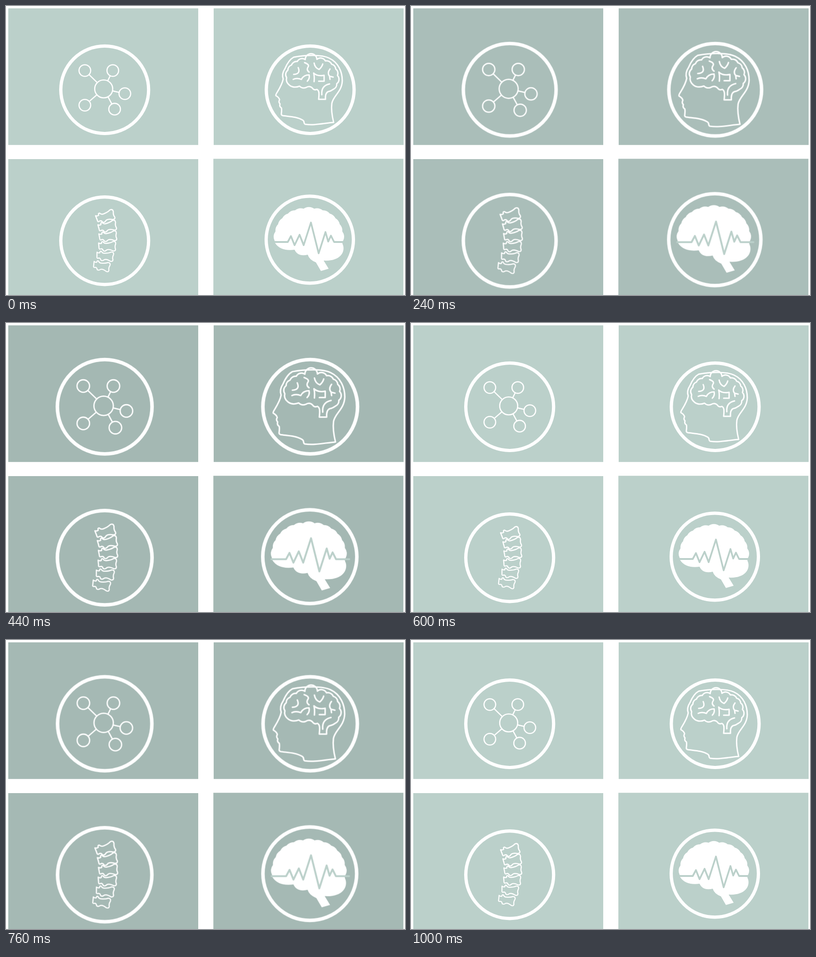
These frames come from a looping animation (878 by 638 pixels, 3000 ms). An HTML page:

```html
<!DOCTYPE html>
<html lang="en">
<head>
<meta charset="utf-8">
<title>Pulsing icons</title>
<style>
  html, body { margin: 0; width: 100%; height: 100%; overflow: hidden; background: #fff; }
  svg { display: block; width: 878px; height: 638px; }
  .icon { fill: none; stroke: #fff; stroke-width: 3; stroke-linecap: round; stroke-linejoin: round; }
  .ring { stroke-width: 7.2; }
  .thin { stroke-width: 2.6; }
  .solid { fill: #fff; stroke: none; }
  .wave { stroke: #bbd0ca; stroke-width: 3.8; }
</style>
</head>
<body>
<svg viewBox="0 0 878 638">
  <g id="panels" fill="#bbd0ca">
    <rect x="5" y="5.2" width="418" height="301.6"/>
    <rect x="457" y="5.2" width="418" height="301.6"/>
    <rect x="5" y="338" width="418" height="300"/>
    <rect x="456.3" y="337.3" width="418.2" height="300.7"/>
  </g>
  <g id="icons"></g>
</svg>
<script>
const path = (d, cls = '') => `<path class="${cls}" d="${d}"/>`;
const circle = (x, y, r, cls) => `<circle class="${cls}" cx="${x}" cy="${y}" r="${r}"/>`;

// Row of outward bumps along a squarish ellipse, clockwise, angles in degrees.
function scallops(cx, cy, rx, ry, from, to, count, bump, power) {
  const square = v => Math.sign(v) * Math.abs(v) ** power;
  let d = '';
  for (let i = 0; i <= count; i++) {
    const a = (from + (to - from) * i / count) * Math.PI / 180;
    d += (i ? `A${bump} ${bump} 0 0 1 ` : 'M') + `${cx + rx * square(Math.cos(a))},${cy + ry * square(Math.sin(a))}`;
  }
  return d;
}

function molecule() {
  const [cx, cy, hub, r] = [215, 183, 19.8, 12.8];
  const atoms = [[173.5, 142.5], [235, 142.5], [261.5, 193.5], [239, 227.7], [173.5, 219]];
  return circle(cx, cy, hub, 'thin') + atoms.map(([x, y]) => {
    const a = Math.atan2(y - cy, x - cx), c = Math.cos(a), s = Math.sin(a);
    return circle(x, y, r, 'thin') +
      path(`M${cx + hub * c},${cy + hub * s}L${x - r * c},${y - r * s}`, 'thin');
  }).join('');
}

function head() {
  const face = 'M606,237Q607,228 606,225Q601,222 603,216Q599,212 602,207Q601,202 594,198Q593,196 597,190' +
    'Q608,172 610,161Q606,150 614,138Q622,119 633,113';
  const skull = 'C660,108 695,107 711,115C732,125 740,146 740,165C739,190 720,198 717,215C715,231 718,245 721,257' +
    'C698,259 678,264 658,261C654,259 658,255 653,252C640,244 622,244 609,242Q605,241 606,237';
  const cortex = scallops(673.5, 158, 56, 40.5, 180, 395, 11, 12, 0.83) +
    'Q715,188 709,189Q702,192 703,206H688C689,195 690,187 684,184Q678,187 674,181Q668,175 660,180Q652,183 646,177Q633,182 624,175Q615,168 617.5,158';
  const folds = 'M657,125Q668,129 665,134Q660,141 667,146M643,136Q649,150 633,151M632,162Q640,158 650,162Q655,152 667,152Q669,160 663,166' +
    'M678,126Q680,137 689,140Q695,135 697,128M678,167Q679,155 677,148Q685,156 700,153V166H688' +
    'M713,139Q706,148 712,155L720,157M712,155L713,162M712,172Q693,176 695,196';
  return path(face + skull) + path(cortex) + path(folds);
}

function spine() {
  const bone = 'M-20,-4Q-16,-2 -13,-4Q-14,-9 -10,-8Q-7,-4 -2,-5Q8,-7 13,-11Q20,-13 20,-6Q18,1 21,6Q22,11 16,11' +
    'Q6,7 1,10Q-3,15 -7,13Q-9,8 -13,9Q-18,12 -18,6Z';
  return Array.from({ length: 6 }, (_, i) => {
    const x = 223.5 - 1.5 * (i - 2) ** 2, y = 463.5 + 21.8 * i;
    return `<g transform="translate(${x} ${y}) rotate(${5.4 * i - 10}) scale(${1 - 0.02 * i})">${path(bone, 'thin')}</g>`;
  }).join('');
}

function pulseBrain() {
  const top = scallops(666.5, 518, 75.5, 71, 180, 360, 13, 20, 0.88);
  const base = 'Q738,521 742,529C746,545 734,564 699,562L710,580L693,585L682,566Q667,560 664,549Q642,554 635,538Q604,542 592,523Z';
  const wave = 'M590,521H620L627,508L635,528L646,505L655,528L671,478L688,546L703,499L709,520L715,507L722,521H749';
  return path(top + base, 'solid') + path(wave, 'wave');
}

const icons = [
  [217.2, 184.9, 96.6, molecule],
  [669.4, 184.9, 96.6, head],
  [217.2, 518.2, 96.6, spine],
  [668.5, 515.8, 96, pulseBrain]
];
const holder = document.getElementById('icons');
holder.innerHTML = icons.map(([x, y, r, draw]) =>
  `<g class="icon" style="transform-origin:${x}px ${y}px">${circle(x, y, r, 'ring')}${draw()}</g>`).join('');

const LOOP = 3000, STEP = 40;

// Swelling from 0 to 1: two sharp beats, then one that rises and fades slowly.
function swell(t) {
  const fade = (start, length) => t < start ? 0 : Math.max(0, 1 - (t - start) / length);
  if (t > 600 && t < 680) return 1 - ((680 - t) / 80) ** 2;
  return t < 400 ? fade(160, 184) : t < 680 ? fade(400, 184) : fade(680, 310);
}

function play(element, style) {
  const frames = [];
  for (let t = 0; t < LOOP; t += STEP) frames.push({ ...style(swell(t)), offset: t / LOOP, easing: 'step-end' });
  element.animate([...frames, { ...style(0), offset: 1 }], { duration: LOOP, iterations: Infinity });
}

const shade = s => [187 - 30 * s, 208 - 31 * s, 202 - 30 * s].map(Math.round);
play(document.getElementById('panels'), s => ({ fill: `rgb(${shade(s)})` }));
for (const icon of holder.children) play(icon, s => ({ transform: `scale(${1 + s / 10})` }));
</script>
</body>
</html>
```
